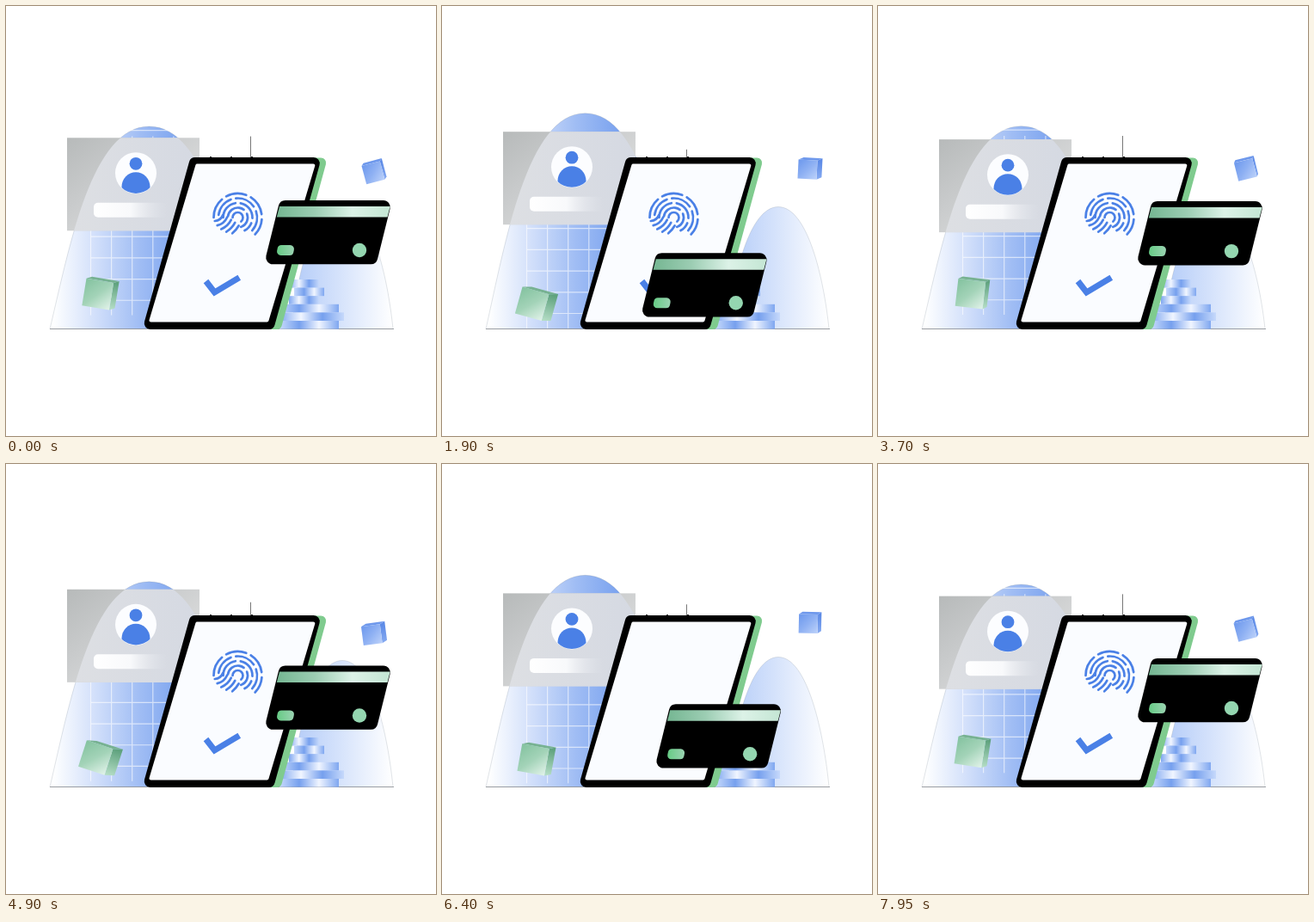
These frames come from a looping animation (500x500 px, 8000 ms). An HTML page with a canvas:

```html
<!DOCTYPE html>
<html lang="en">
<head>
<meta charset="utf-8">
<title>Card payment</title>
<style>
html, body { margin: 0; width: 100%; height: 100%; overflow: hidden; background: #fff; }
canvas { display: block; width: 100vmin; height: 100vmin; }
</style>
</head>
<body>
<canvas id="stage" width="500" height="500"></canvas>
<script>
const c = document.getElementById('stage').getContext('2d');
const PERIOD = 4000;
const BLUE = '#4a80e6';
const BASE = 375.5;

const wave = (t, shift, period = PERIOD) => Math.sin(2 * Math.PI * (t - shift) / period);
const ramp = (t, a, b) => Math.max(0, Math.min(1, (t - a) / (b - a)));
const ease = u => (1 - Math.cos(Math.PI * u)) / 2;
const rad = d => d * Math.PI / 180;

function grad(x0, y0, x1, y1, ...colors) {
  const g = c.createLinearGradient(x0, y0, x1, y1);
  colors.forEach((col, i) => g.addColorStop(i / (colors.length - 1), col));
  return g;
}

function poly(fill, pts, r = 0) {
  const n = pts.length, [ax, ay] = pts[0], [zx, zy] = pts[n - 1];
  c.beginPath();
  c.moveTo((ax + zx) / 2, (ay + zy) / 2);
  pts.forEach((p, i) => {
    const q = pts[(i + 1) % n];
    c.arcTo(p[0], p[1], q[0], q[1], r);
  });
  c.closePath();
  c.fillStyle = fill;
  c.fill();
}

// Parallelogram leaning right, given by its bottom edge and the shift of its top
function slab(fill, x, y, w, h, lean, r) {
  poly(fill, [[x + lean, y], [x + lean + w, y], [x + w, y + h], [x, y + h]], r);
}

function disc(x, y, r, fill) {
  c.beginPath();
  c.arc(x, y, r, 0, 7);
  c.fillStyle = fill;
  c.fill();
}

function humpPath(cx, half, top, bulge) {
  const bend = BASE - (BASE - top) * 0.41;
  c.beginPath();
  c.moveTo(cx - half, BASE);
  c.bezierCurveTo(cx - half * bulge, bend, cx - half * 0.58, top, cx, top);
  c.bezierCurveTo(cx + half * 0.58, top, cx + half * bulge, bend, cx + half, BASE);
  c.closePath();
}

function hump(shape, fill) {
  humpPath(...shape);
  c.fillStyle = fill;
  c.fill();
  c.lineWidth = 0.6;
  c.strokeStyle = 'rgba(130,140,155,.4)';
  c.stroke();
}

function grid(y) {
  c.strokeStyle = 'rgba(255,255,255,.6)';
  c.lineWidth = 1.2;
  c.beginPath();
  for (let i = 0; i < 5; i++) {
    const x = 98.5 + i * 24.1;
    c.moveTo(x, y - 166);
    c.lineTo(x, Math.min(BASE, y + 42));
  }
  for (let i = -7; i < 2; i++) {
    c.moveTo(98, y + i * 24.7);
    c.lineTo(210, y + i * 24.7);
  }
  c.stroke();
}

function profile(y, humpShape) {
  c.fillStyle = grad(71, y, 150, y + 108, '#b7baba', '#c9cbcc', '#dcdddd');
  c.fillRect(71, y, 154, 108);
  c.save();
  humpPath(...humpShape);
  c.clip();
  c.fillStyle = grad(80, 0, 225, 0, '#dddfe3', '#d5d9e2');
  c.fillRect(71, y, 154, 108);
  c.restore();

  disc(151, y + 41, 24, '#fcfdff');
  disc(151, y + 30, 7.4, BLUE);
  c.save();
  c.beginPath();
  c.arc(151, y + 41, 23.6, 0, 7);
  c.clip();
  c.beginPath();
  c.ellipse(151, y + 57, 16.5, 17, 0, Math.PI, 0);
  c.lineTo(167.5, y + 66);
  c.lineTo(134.5, y + 66);
  c.fillStyle = BLUE;
  c.fill();
  c.restore();
  slab(grad(102, 0, 188, 0, '#fff', '#f8f9fb', 'rgba(225,228,235,0)'), 102, y + 75.5, 88, 17, 0, 5);
}

function coins() {
  for (let i = 0; i < 6; i++) {
    const stack = i < 3 ? 0 : 1;
    const x = (stack ? 341 : 329) + (i % 3 === 1 ? 6 : 0);
    const w = stack ? 46 : 35;
    const left = stack ? 318 : x;
    const shine = ['#7fa7f0', '#f0f5ff', '#76a0ee', '#c6d9fb'];
    c.fillStyle = grad(left, 0, x + w, 0, ...(i % 2 ? shine.reverse() : shine));
    c.fillRect(left, 318 + i * 9.6, x + w - left, 9.6);
  }
}

function tablet() {
  slab('#7fcb8e', 170, 176.5, 149.5, 199.5, 54.5, 6);
  slab('#000', 158.5, 176, 152.5, 200, 56, 7);
  slab('#fafcff', 165.8, 183.5, 139.2, 184, 55, 2);
}

function arc(x, y, r, a, b, part) {
  c.beginPath();
  c.arc(x, y, r, b - (b - a) * part, b);
  c.stroke();
}

// Broken arches, with short ridges flowing away to the lower left
function fingerprint(part) {
  if (part <= 0) return;
  c.strokeStyle = BLUE;
  c.lineWidth = 2.7;
  c.lineCap = 'round';
  for (let i = 0; i < 5; i++) {
    const r = 6 + 5.5 * i, end = rad(80 - 9 * i);
    const step = 30 / r, gap = 6 / r;
    for (let a = rad(-180 + 8 * (i % 2)); a < end - gap; a += step) {
      arc(269.5, 246, r, a, Math.min(end, a + step - gap), part);
    }
    arc(242, 239, 11 + 5.5 * i, rad(22 + 2 * i), rad(86 - 9 * i), part);
  }
  c.lineCap = 'butt';
}

function check(part) {
  if (part <= 0) return;
  c.save();
  c.setLineDash([50 * part, 100]);
  c.strokeStyle = BLUE;
  c.lineWidth = 7;
  c.beginPath();
  c.moveTo(232.5, 320);
  c.lineTo(242.5, 333);
  c.lineTo(271.5, 315.5);
  c.stroke();
  c.restore();
}

// Front square with an extruded top and right side
function cube(x, y, size, turn, dx, dy, front, side, top) {
  c.save();
  c.translate(x, y);
  c.rotate(rad(turn));
  const l = -(size + dx) / 2, r = l + size, t = (dy - size) / 2, b = t + size;
  poly(grad(0, t, 0, b, ...side), [[r, t], [r + dx, t - dy], [r + dx, b - dy], [r, b]]);
  poly(top, [[l, t], [l + dx, t - dy], [r + dx, t - dy], [r, t]]);
  poly(grad(l, t, r, b, ...front), [[l, t], [r, t], [r, b], [l, b]]);
  c.restore();
}

function bankCard(dx, dy) {
  c.save();
  c.translate(dx, dy);
  slab('#000', 300, 226, 130.5, 74.3, 18.5, 8);
  slab(grad(316, 0, 446, 0, '#76b793', '#9ccdb3', '#dcf2e7', '#c4e6d4'), 314.8, 233, 128.7, 12.5, 3.2);
  slab(grad(315, 0, 335, 0, '#66cb85', '#9bd3b2'), 314, 278, 19.5, 12, 2.5, 4.5);
  disc(411, 284, 8.2, '#94d6b0');
  c.restore();
}

function draw(time) {
  const t = time % PERIOD;
  c.fillStyle = '#fff';
  c.fillRect(0, 0, 500, 500);

  const rise = Math.pow(1 - Math.abs(t - 2000) / 2000, 2.1);
  const left = [166.5, 115.5, 140 - 17 * rise, 0.8];
  const right = [391, 59, 231 - 7 * wave(t, 20, 2000), 0.9];
  const gridY = 325 + 8 * wave(t, 760);

  hump(left, grad(56, 0, 205, 0, '#fdfeff', '#d0defa', '#a0bdf4', '#7ba3ef'));
  hump(right, grad(318, 0, 450, 0, '#aac5f7', '#d3e1fb', '#ffffff'));
  grid(gridY);
  profile(150.1 - 5.8 * wave(t, 370), left);

  c.fillStyle = '#777';
  c.fillRect(284, gridY - 166, 1, 342 - gridY);
  c.fillStyle = '#222';
  for (let i = 0; i < 3; i++) c.fillRect(237 + 24 * i, 175, 2, 2);
  c.fillStyle = '#8a8e93';
  c.fillRect(51, 375, 400, 0.8);

  coins();
  tablet();

  const gone = ramp(t, 2000, 2400);
  fingerprint(t < 2600 ? 1 - gone : ramp(t, 2650, 3170));
  check(t < 2600 ? 1 - gone : ramp(t, 2870, 3280));

  cube(110, 340 + 6.5 * wave(t, 720), 32, 12 + 7 * wave(t, 250),
    8 + 4 * wave(t, 300), 3,
    ['#83c29f', '#a3d3b8', '#e2f3ea'], ['#5fa27e', '#b7dfc8'], '#77b292');
  cube(428, 190 + 7 * wave(t, -200), 22, -6 - 9 * wave(t, -1000),
    4.2 + 2.3 * wave(t, 400), 2.8,
    ['#6c98ed', '#8fb1f3', '#bdd2fa'], ['#5c8ae6', '#86aaf1'], '#6e98ec');

  const swipe = t < 2100 ? ease(ramp(t, 1300, 2100)) : 1 - ease(ramp(t, 2100, 2850));
  const sink = 20 * ease(t / 2000);
  bankCard(-81 * swipe, sink + 45.5 * Math.pow(swipe, 0.6));
}

const start = performance.now();
function tick() {
  draw(performance.now() - start);
  requestAnimationFrame(tick);
}
tick();
</script>
</body>
</html>
```
